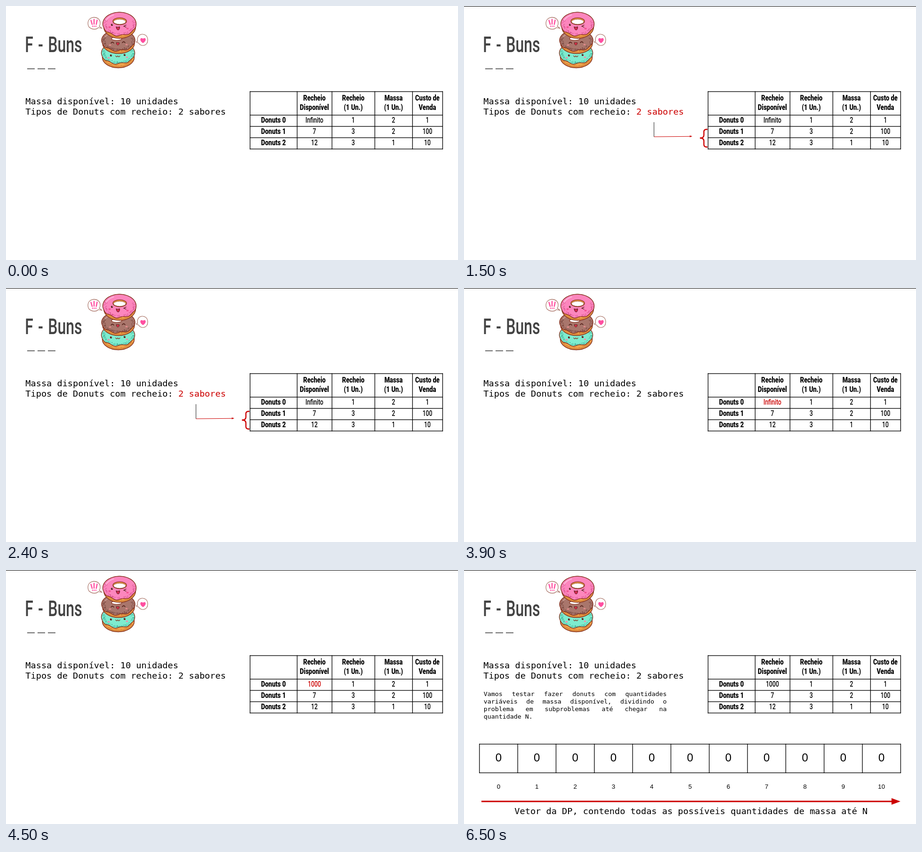
These frames come from a looping animation (960x540 px, 8000 ms). An HTML page with a canvas:

```html
<!DOCTYPE html>
<html lang="pt">
<head>
<meta charset="utf-8">
<title>F - Buns</title>
<style>
html, body { margin: 0; width: 100%; height: 100%; overflow: hidden; background: #fff; }
canvas { display: block; }
</style>
</head>
<body>
<canvas id="stage" width="960" height="540"></canvas>
<script>
const ctx = document.getElementById('stage').getContext('2d');
const LOOP = 8000;
const BLACK = '#000', RED = '#cc0000', GREY = '#434343', LINE = '#842f1c', PINK = '#ff4fa0';
const BORDER = 4 / 3;

// Faces: weight, family, and one fixed proportion per face.
const FACES = {
  title: { weight: 500, family: 'Roboto, sans-serif', sx: 0.69, sy: 1, space: '3.5px' },
  cell: { weight: 500, family: 'Roboto, sans-serif', sx: 0.75, sy: 1 },
  head: { weight: 800, family: 'Roboto, sans-serif', sx: 0.805, sy: 1 },
  mono: { weight: 400, family: '"DejaVu Sans Mono", monospace', sx: 0.9966, sy: 0.9 },
  sans: { weight: 400, family: '"Liberation Sans", Arial, sans-serif', sx: 1, sy: 1 }
};

function text(str, x, y, face, size, color = BLACK, align = 'left') {
  const f = FACES[face];
  ctx.save();
  ctx.translate(x, y);
  ctx.scale(f.sx, f.sy);
  ctx.font = `${f.weight} ${size}px ${f.family}`;
  ctx.wordSpacing = f.space || '0px';
  ctx.textAlign = align;
  ctx.fillStyle = color;
  ctx.fillText(str, 0, 0);
  ctx.restore();
}

function justify(str, x, y, width, size) {
  const words = str.split(' ');
  const advance = size * 0.6;
  const gap = (width - words.join('').length * advance) / (words.length - 1);
  for (const word of words) {
    text(word, x, y, 'mono', size);
    x += word.length * advance + gap;
  }
}

function rect(x, y, w, h, color) {
  ctx.fillStyle = color;
  ctx.fillRect(x, y, w, h);
}

// Borders are centred on the given coordinates.
function grid(xs, ys) {
  const half = BORDER / 2, left = xs[0] - half, top = ys[0] - half;
  const width = xs[xs.length - 1] + half - left, height = ys[ys.length - 1] + half - top;
  for (const x of xs) rect(x - half, top, BORDER, height, BLACK);
  for (const y of ys) rect(left, y - half, width, BORDER, BLACK);
}

function shape(d, fill, stroke, width = 1) {
  const path = new Path2D(d);
  if (fill) { ctx.fillStyle = fill; ctx.fill(path); }
  if (stroke) { ctx.strokeStyle = stroke; ctx.lineWidth = width; ctx.stroke(path); }
}

function oval(x, y, rx, ry, fill, stroke, width = 1) {
  ctx.beginPath();
  ctx.ellipse(x, y, rx, ry, 0, 0, Math.PI * 2);
  if (fill) { ctx.fillStyle = fill; ctx.fill(); }
  if (stroke) { ctx.strokeStyle = stroke; ctx.lineWidth = width; ctx.stroke(); }
}

function random(seed) {
  return () => (seed = (seed * 16807) % 2147483647) / 2147483647;
}

function donut({ x, y, rx, ry, drop, color, shade, light, seed }) {
  const rnd = random(seed);
  oval(x + 0.5, y + drop, rx - 1.5, ry, '#f2a34b', LINE, 1.4);
  ctx.lineWidth = 0.8;
  ctx.strokeStyle = '#a9561f';
  for (let a = 0.35; a < 2.8; a += 0.09) {
    const len = 2 + rnd() * 2.5;
    const px = x + Math.cos(a) * (rx - 3), py = y + drop + Math.sin(a) * (ry - 1);
    ctx.beginPath();
    ctx.moveTo(px, py);
    ctx.lineTo(px - Math.cos(a) * len, py - len);
    ctx.stroke();
  }
  // Icing with a wavy lower edge.
  ctx.beginPath();
  for (let i = 0; i <= 90; i++) {
    const a = i / 90 * Math.PI * 2, low = Math.max(0, Math.sin(a));
    ctx.lineTo(x + Math.cos(a) * rx, y + Math.sin(a) * ry + Math.sin(a * 8) * 1.7 * low);
  }
  ctx.closePath();
  ctx.fillStyle = color;
  ctx.fill();
  ctx.strokeStyle = LINE;
  ctx.lineWidth = 1.4;
  ctx.stroke();
  for (let i = 0; i < 130; i++) {
    const a = rnd() * Math.PI * 1.25 - 0.35, r = 0.78 + rnd() * 0.18;
    rect(x + Math.cos(a) * rx * r, y + Math.sin(a) * ry * r, 1, 1, shade);
  }
  ctx.strokeStyle = light;
  ctx.lineWidth = 1.6;
  ctx.beginPath();
  ctx.ellipse(x, y, rx - 5, ry - 4, 0, 3.5, 4.3);
  ctx.stroke();
}

function eye(x, y) {
  oval(x, y, 2.1, 2.2, '#4a1710');
  oval(x + 0.7, y - 0.8, 0.7, 0.7, '#fff');
}

function donuts() {
  ctx.lineCap = ctx.lineJoin = 'round';
  donut({ x: 238, y: 100, rx: 35.5, ry: 22.5, drop: 9, color: '#7eeccf', shade: '#2e9c86', light: '#c8fff0', seed: 11 });
  eye(223, 105);
  eye(252, 104);
  oval(218, 110, 2.5, 1.6, '#f58aa8');
  oval(257, 109, 2.5, 1.6, '#f58aa8');
  shape('M233 106q2 4 4.5 0q2 4 4.5 0', null, LINE, 1.3);

  donut({ x: 238.5, y: 73, rx: 35.5, ry: 22, drop: 6, color: '#a9766c', shade: '#67352e', light: '#cfa197', seed: 23 });
  oval(235, 69.5, 11, 3.5, '#fff', LINE, 1.2);
  shape('M223 79q3-4 6 0M247 78q3-4 6 0', null, '#4a1710', 1.3);
  shape('M234.5 78h6q0 5-3 5t-3-5z', '#e0344f', '#4a1710', 0.9);
  oval(221, 83, 2.5, 1.5, '#e58c8c');
  oval(256, 82, 2.5, 1.5, '#e58c8c');

  donut({ x: 241, y: 38, rx: 35.5, ry: 24.7, drop: 6, color: '#fc86bd', shade: '#c9407f', light: '#ffc4e1', seed: 37 });
  oval(241.5, 32.5, 14.5, 7.3, '#f2a34b', LINE, 1.3);
  oval(241.5, 33.5, 13, 5.4, '#fff', LINE, 0.8);
  eye(225, 40);
  shape('M255 40.5l-5 2.5l5 2', null, '#4a1710', 1.3);
  shape('M234 44.5q4 1.5 7.5-0.5q0 7-3.3 7t-4.2-6.5z', '#d92a55', '#4a1710', 1);
  oval(220, 45, 2.7, 1.8, '#f0508f');
  oval(258, 48, 2.7, 1.8, '#f0508f');

  shape('M196 46C190 52 174 50 174 37C174 20 200 20 200 36Q200 41 198 43L204 47.5Z', '#fff', '#a2685b', 1.1);
  shape('M180.5 30.5l2.5 8.5M187 28.5v10M193.5 30l-1.8 9', null, PINK, 2.5);
  for (const x of [184, 187.5, 191]) oval(x, 43, 1.3, 1.3, PINK);
  shape('M279.5 75C276 56 301 55 301 72C301 86 286 87 282 79L276.5 76.5Z', '#fff', '#a2685b', 1.1);
  shape('M291 79C282 74 285 65 291 69.5C297 65 300 74 291 79Z', PINK);
  ctx.lineCap = 'butt';
  ctx.lineJoin = 'miter';
}

function priceTable(stock, stockColor) {
  grid([518.4, 618.4, 692.4, 783.4, 863.4, 927.4], [182, 232, 256, 280, 304]);
  const cols = [568, 655, 737.5, 823, 895];
  const heads = [['Recheio', 'Disponível'], ['Recheio', '(1 Un.)'], ['Massa', '(1 Un.)'], ['Custo de', 'Venda']];
  heads.forEach((lines, i) => lines.forEach((line, j) =>
    text(line, cols[i + 1], 201 + j * 20, 'head', 16.2, BLACK, 'center')));
  const rows = [[stock, 1, 2, 1], [7, 3, 2, 100], [12, 3, 1, 10]];
  rows.forEach((row, r) => {
    const y = 248 + r * 24;
    text('Donuts ' + r, cols[0], y, 'head', 16.2, BLACK, 'center');
    row.forEach((v, c) =>
      text(String(v), cols[c + 1], y, 'cell', 16.2, r + c ? BLACK : stockColor, 'center'));
  });
}

function flavourNote() {
  shape('M403.5 247V278', null, '#222', 1);
  shape('M403.5 278L480 277.2', null, RED, 1.1);
  shape('M479.5 275.2L485 277.1L479.5 279.1Z', RED);
  shape('M517 262.2H515Q509.5 262.2 509.5 267.5V274.5Q509.5 280.8 501 280.8Q509.5 280.8 509.5 287V294.5Q509.5 299.8 515 299.8H517', null, RED, 2.4);
}

function vector() {
  const lines = ['Vamos testar fazer donuts com quantidades', 'variáveis de massa disponível, dividindo o',
    'problema em subproblemas até chegar na'];
  lines.forEach((line, i) => justify(line, 41.7, 268 + i * 16, 388.8, 13.333));
  text('quantidade N.', 41.7, 316, 'mono', 13.333);

  const left = 32.8, step = 81.33;
  grid(Array.from({ length: 12 }, (_, i) => left + i * step), [370.2, 431.2]);
  for (let i = 0; i <= 10; i++) {
    const x = left + (i + 0.5) * step;
    text('0', x, 407, 'sans', 24, BLACK, 'center');
    text(String(i), x, 465, 'sans', 13.333, BLACK, 'center');
  }
}

function caption() {
  rect(37, 490.5, 873, 3, RED);
  shape('M908 485L927 492L908 499Z', RED);
  text('Vetor da DP, contendo todas as possíveis quantidades de massa até N', 107.3, 519, 'mono', 18.667);
}

function draw(t) {
  const note = t >= 1500 && t < 3000;
  const marked = t >= 3000 && t < 6000;
  rect(0, 0, 960, 540, '#fff');
  if (t >= 1500) rect(0, 0, 960, 1, BLACK);

  text('F - Buns', 40.2, 98, 'title', 46.5, GREY);
  for (let i = 0; i < 3; i++) rect(45 + i * 22, 132.7, 16, 1.6, GREY);
  donuts();

  text('Massa disponível: 10 unidades', 41.3, 209, 'mono', 18.667);
  text('Tipos de Donuts com recheio:', 41.3, 231, 'mono', 18.667);
  text('2 sabores', 41.3 + 29 * 11.2, 231, 'mono', 18.667, note ? RED : BLACK);

  priceTable(t < 4500 ? 'Infinito' : '1000', marked ? RED : BLACK);
  if (note) flavourNote();
  if (t >= 6000) vector();
  if (t >= 6500) caption();
}

const start = performance.now();
function tick() {
  draw((performance.now() - start) % LOOP);
  requestAnimationFrame(tick);
}
tick();
</script>
</body>
</html>
```
